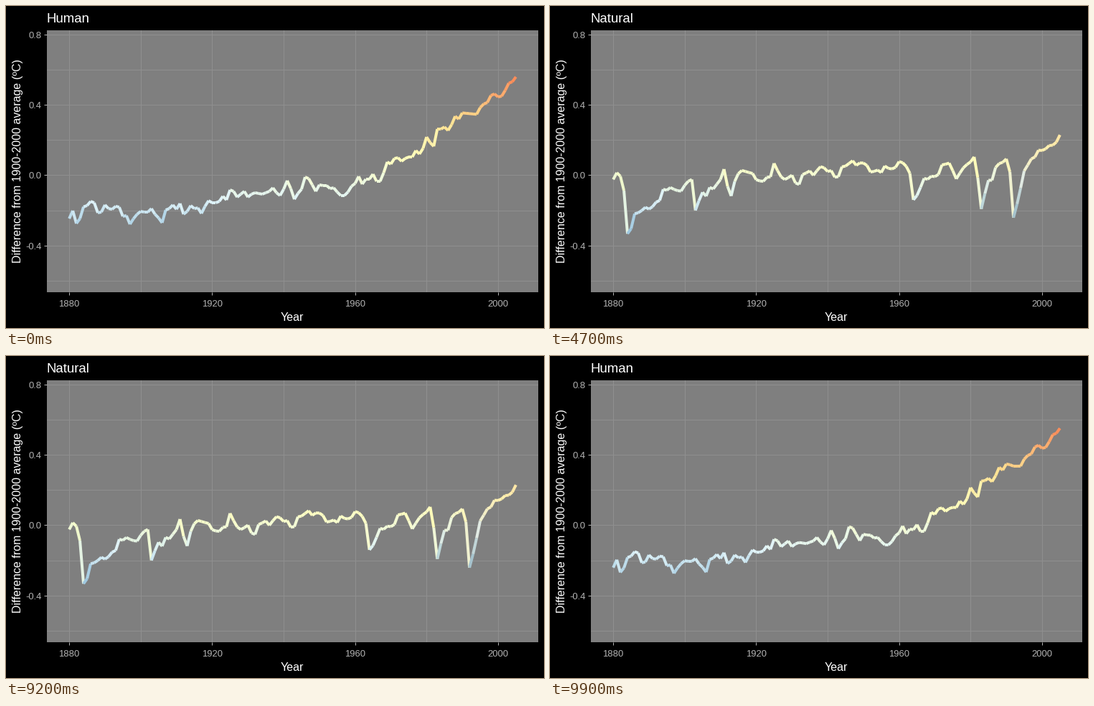
Animation, 750 px wide and 450 px high, one loop 10 s. Source, as a matplotlib script:

```python
import math

import matplotlib.pyplot as plt
import numpy as np
from matplotlib.animation import FuncAnimation
from matplotlib.collections import LineCollection

W, H, DPI = 750, 450, 100
PX = 72 / DPI
LEFT, TOP, RIGHT, BOTTOM = 57, 34, 742, 400
Y_MAX, Y_MIN = 0.8236, -0.6657
HOLD, STEPS = 40, 11
HALF = HOLD + STEPS - 1

# Yearly anomaly from 1880 to 2005, in thousandths of a degree
HUMAN = np.array([
    -247, -202, -275, -247, -180, -173, -149, -157, -214, -210,
    -169, -190, -194, -177, -182, -234, -230, -279, -247, -222,
    -206, -210, -210, -190, -222, -243, -271, -198, -190, -169,
    -194, -161, -222, -206, -173, -190, -186, -218, -177, -145,
    -157, -157, -149, -120, -141, -84, -92, -125, -108, -92,
    -125, -108, -100, -104, -108, -100, -92, -72, -100, -116,
    -80, -31, -76, -137, -104, -80, -11, -19, -55, -92,
    -55, -59, -59, -76, -72, -96, -116, -116, -96, -63,
    -47, -7, -51, -23, -23, 6, -35, -35, 14, 75,
    63, 95, 99, 79, 95, 103, 103, 140, 120, 152,
    217, 185, 164, 262, 262, 274, 254, 287, 335, 319,
    354, 352, 350, 348, 346, 384, 405, 413, 453, 462,
    445, 449, 482, 523, 531, 559]) / 1000

NATURAL = np.array([
    22, 59, 50, -55, -365, -332, -234, -226, -198, -177,
    -198, -177, -145, -137, -59, -55, -37, -39, -55, -63,
    -27, 2, 14, -202, -129, -67, -88, -43, -55, -27,
    10, 75, -31, -100, -7, 50, 71, 71, 55, 42,
    2, -7, -11, 10, 18, 99, 50, 14, -7, 2,
    26, -31, -43, 26, 38, 50, 18, 46, 79, 75,
    42, 38, 2, 18, 79, 79, 83, 103, 79, 103,
    95, 79, 34, 42, 50, 38, 87, 71, 63, 67,
    103, 87, 71, 18, -165, -141, -76, -15, -31, -23,
    -23, -15, 50, 59, 63, 10, -47, -15, 26, 42,
    46, 87, -51, -287, -182, -92, -88, -7, 10, 22,
    38, -51, -365, -271, -161, -51, -15, 26, 30, 75,
    77, 87, 103, 97, 116, 160]) / 1000

YEARS = np.arange(1880, 2006)
PALETTE = ["#4575B4", "#91BFDB", "#E0F3F8", "#FFFFBF",
           "#FEE090", "#FC8D59", "#D73027"]


def shade(values):
    rgb = np.array([[int(c[i:i + 2], 16) / 255 for i in (1, 3, 5)]
                    for c in PALETTE])
    stops = np.linspace(-0.598, 0.756, len(PALETTE))
    return np.column_stack([np.interp(values, stops, ch) for ch in rgb.T])


def label(x, y, text, size, color="white", **kw):
    kw = {"va": "baseline", **kw}
    return fig.text(x / W, 1 - y / H, text, fontsize=size * PX,
                    color=color, family="Liberation Sans", **kw)


def px_x(year):
    return LEFT + (year - 1873.75) / 137.5 * (RIGHT - LEFT)


def px_y(value):
    return TOP + (Y_MAX - value) / (Y_MAX - Y_MIN) * (BOTTOM - TOP)


fig = plt.figure(figsize=(W / DPI, H / DPI), dpi=DPI, facecolor="black")
ax = fig.add_axes([LEFT / W, 1 - BOTTOM / H,
                   (RIGHT - LEFT) / W, (BOTTOM - TOP) / H],
                  facecolor="#7f7f7f")
ax.set_xlim(1873.75, 2011.25)
ax.set_ylim(Y_MIN, Y_MAX)
for side in ax.spines.values():
    side.set_visible(False)

ax.set_axisbelow(True)
ax.set_xticks(range(1880, 2001, 40))
ax.set_xticks(range(1900, 1981, 40), minor=True)
ax.set_yticks([-0.4, 0, 0.4, 0.8])
ax.set_yticks([-0.6, -0.2, 0.2, 0.6], minor=True)
ax.grid(which="both", color="#8f8f8f", linewidth=PX)
ax.tick_params(which="major", length=4 * PX, width=PX, color="#b3b3b3",
               labelbottom=False, labelleft=False)
ax.tick_params(which="minor", length=0)

for year in range(1880, 2001, 40):
    label(px_x(year), 420, str(year), 13, "#b3b3b3", ha="center")
for value in (-0.4, 0, 0.4, 0.8):
    label(49.5, px_y(value) + 5, f"{value:.1f}", 13, "#b3b3b3", ha="right")
label(399, 440, "Year", 16, ha="center")
label(21, 217, "Difference from 1900-2000 average (ºC)", 16,
      ha="left", rotation=90, rotation_mode="anchor").set_ha("center")
title = label(57, 23, "Human", 18.7, ha="left")

line = LineCollection([], linewidths=4 * PX, capstyle="butt", zorder=3)
ax.add_collection(line, autolim=False)

SERIES = [("Human", HUMAN, shade(HUMAN)),
          ("Natural", NATURAL, shade(NATURAL))]


def draw(frame):
    half, pos = divmod(frame, HALF)
    a, b = SERIES[half], SERIES[1 - half]
    step = max(0, pos - HOLD + 1) / STEPS
    t = (1 - math.cos(math.pi * step)) / 2
    pts = np.column_stack([YEARS, a[1] + (b[1] - a[1]) * t])
    line.set_segments(np.stack([pts[:-1], pts[1:]], axis=1))
    line.set_color((a[2] + (b[2] - a[2]) * t)[:-1])
    title.set_text(a[0] if step < 0.5 else b[0])
    return line, title


anim = FuncAnimation(fig, draw, frames=2 * HALF, interval=100,
                     init_func=lambda: draw(0), repeat=True, repeat_delay=0)
plt.show()
```
